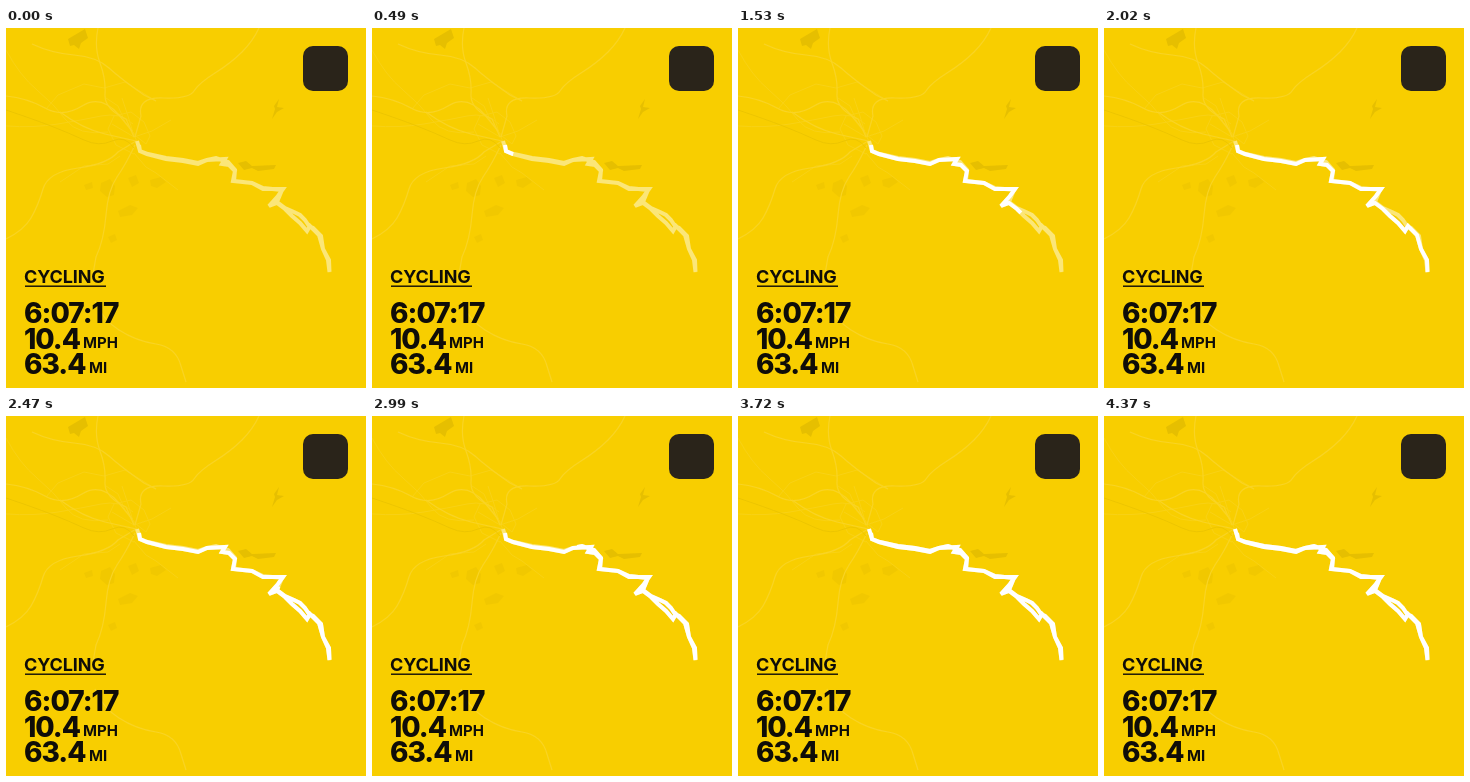
Write an HTML page that moves like this. It is 360 px wide and 360 px high and loops after 5100 ms.

```html
<!DOCTYPE html>
<html lang="en">
<head>
<meta charset="utf-8">
<title>Cycling route</title>
<style>
  html, body { margin: 0; width: 100%; height: 100%; overflow: hidden; background: #f8ce00; }
  svg { display: block; width: 100vw; height: 100vh; }
  .roads, .minor, .rail, .route { fill: none; }
  .roads { stroke: #f9d424; stroke-width: 1.2; }
  .minor { stroke: #f8d215; stroke-width: 1; }
  .rail { stroke: #eac300; stroke-width: .8; }
  .land { fill: #e6bf00; }
  .soft { fill: #f1c800; }
  .route { stroke: #fbe678; stroke-width: 4; stroke-linejoin: miter; stroke-miterlimit: 4; }
  .ridden {
    stroke: #fff;
    stroke-dasharray: 100 101;
    stroke-dashoffset: 100;
    animation: ride 5100ms infinite;
  }
  @keyframes ride {
    0% { stroke-dashoffset: 100; }
    7.55% { stroke-dashoffset: 100; animation-timing-function: steps(42); }
    66.37%, 100% { stroke-dashoffset: 0; }
  }
  text { font-family: Inter, "Open Sans", sans-serif; font-weight: 700; fill: #0f0d08; }
  .title { font-size: 18px; letter-spacing: -.1px; }
  .stat { font-size: 28px; font-weight: 800; letter-spacing: -1px; }
  .unit { font-size: 15px; }
</style>
</head>
<body>
<svg viewBox="0 0 360 360">
  <rect width="360" height="360" fill="#f8ce00"/>

  <g class="land">
    <path d="M62 11L79 1L82 10L75 15L73 21L68 17L64 18Z"/>
    <path d="M273 71L271 79L278 80L271 84L266 91L269 81L268 78Z"/>
    <path d="M232 135L240 133L246 138L270 137L268 141L252 143L246 140L238 142Z"/>
  </g>
  <g class="soft">
    <path d="M95 155L104 151L109 158L108 167L101 169L94 163Z"/>
    <path d="M112 183L124 177L132 180L126 187L114 189Z"/>
    <path d="M122 150L130 147L133 155L126 159Z"/>
    <path d="M144 152L155 149L160 154L151 160L145 158Z"/>
    <path d="M78 157L86 154L87 160L80 162Z"/>
    <path d="M102 209L109 206L111 212L105 215Z"/>
  </g>

  <g class="minor">
    <path d="M0 22Q14 48 31 62T60 92T102 104"/>
    <path d="M0 98Q28 100 52 96T95 88T127 96"/>
    <path d="M40 81L52 67L78 56L98 60L119 54L150 73"/>
    <path d="M100 70L112 78L119 94L130 108L140 116L144 108L138 94L125 84L108 88L102 101L110 117L128 126"/>
    <path d="M116 70L122 88L127 105L134 120M106 96L128 109L146 103L165 92"/>
    <path d="M128 125L140 139L150 145L172 162M114 128L102 136L78 138L54 154"/>
  </g>

  <g class="roads">
    <path d="M253 0Q247 13 236 24T209 45T188 63T157 70T135 88L129 109"/>
    <path d="M26 16Q45 25 68 27T103 40T138 67L150 73"/>
    <path d="M92 0Q88 19 94 35T99 66T120 91L128 109"/>
    <path d="M0 68Q21 70 39 80T76 78T113 87L126 103"/>
    <path d="M0 211Q18 202 25 190T37 161T72 140T112 124L130 113"/>
    <path d="M129 117Q120 136 111 149T100 187T90 229L87 246"/>
    <path d="M89 273Q96 291 113 302T150 316T175 338L180 354"/>
    <path d="M54 84Q77 101 99 106T130 113"/>
  </g>
  <path class="rail" d="M0 82Q27 91 45 98T78 112T106 113T128 120"/>

  <!-- Out to the far end, then back along a slightly different line -->
  <defs>
    <path id="route" pathLength="100" d="M133 117L134 123L141 126L160 131L177 133L192 136L201 132L219 131L216 136L223 137L229 143L227 153L246 155L257 161L277 161L272 168L263 178L271 175L279 181L286 188L294 195L301 203L304 198L313 207L317 221L323 232L323.5 244
      L322 232L317 221L315 208L307 200L303 198L299 192L294 187L288 184L279 180L271 174L276 162L257 160L246 155L228 153L229 142L222 134L210 130L201 132L192 135L177 132L160 130L142 126L134 123L131 113"/>
  </defs>
  <use href="#route" class="route"/>
  <use href="#route" class="route ridden"/>

  <rect x="297" y="18" width="45" height="45" rx="10" fill="#2a241a"/>

  <text class="title" x="18" y="255">CYCLING</text>
  <rect x="19" y="257.5" width="81" height="1.4" fill="#0f0d08"/>
  <text class="stat" x="18" y="295">6:07:17</text>
  <text class="stat" x="18" y="320.5">10.4</text>
  <text class="unit" x="77" y="319.5">MPH</text>
  <text class="stat" x="18" y="346">63.4</text>
  <text class="unit" x="83" y="345">MI</text>
</svg>
</body>
</html>
```
